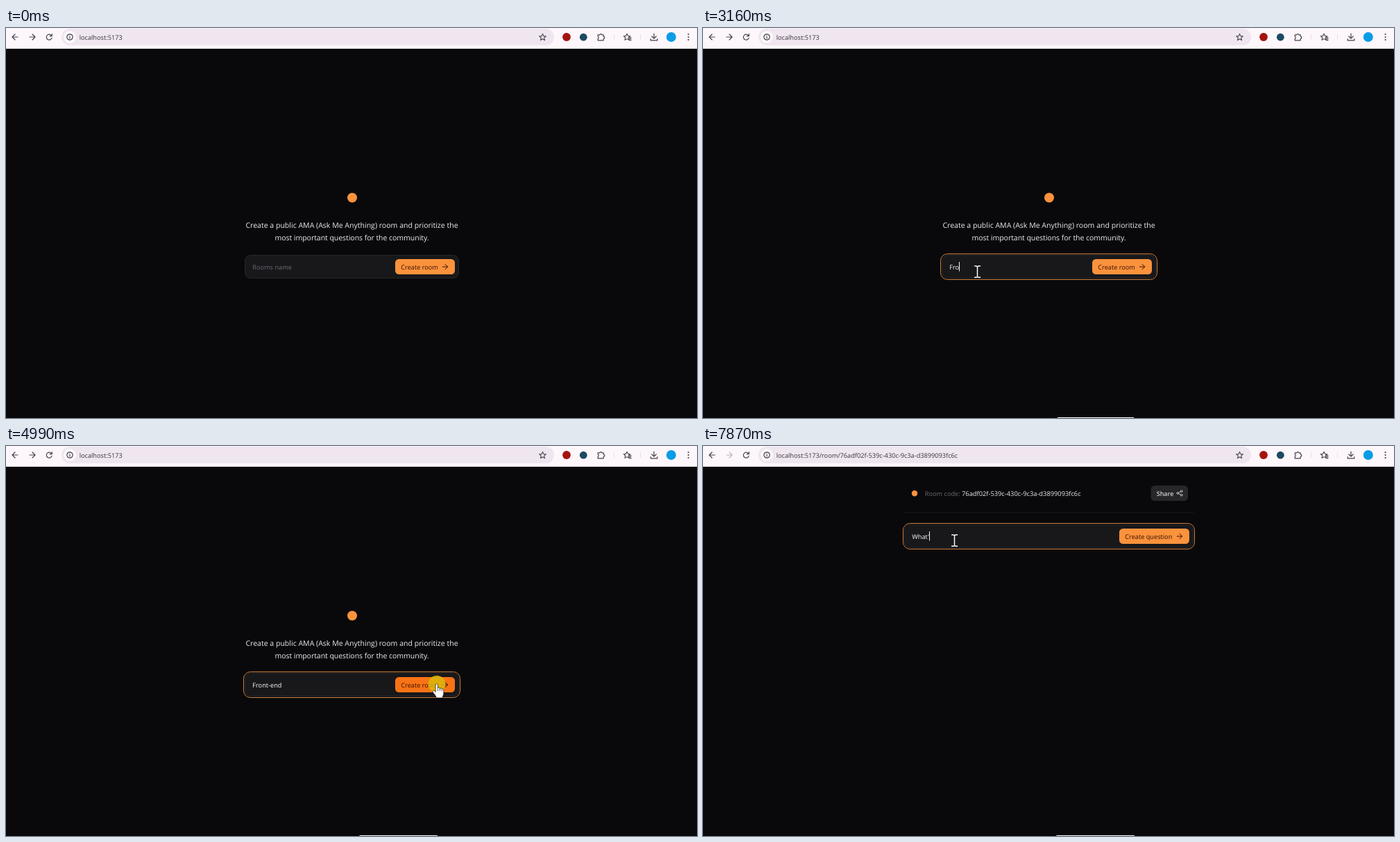
Animation, 996 px wide and 562 px high, one loop 8000 ms. Source, as an HTML page:

```html
<!DOCTYPE html>
<html lang="en">
<head>
<meta charset="utf-8">
<title>Create a room</title>
<style>
  html, body { margin: 0; width: 100%; height: 100%; overflow: hidden; background: #09090b; }
  svg { display: block; width: 996px; height: 562px; }
  text { font: 9.2px "Open Sans", "Noto Sans", sans-serif; white-space: pre; text-rendering: geometricPrecision; }
  .lead { font-size: 10.56px; fill: #ececf0; text-anchor: middle; }
  .hint { fill: #6a6a74; }
  .typed { fill: #fff; }
  .on-btn { fill: #3a1005; }
  .icon { fill: none; stroke-linecap: round; stroke-linejoin: round; }
  .bar .icon { stroke: #47424a; stroke-width: 1.2; }
</style>
</head>
<body>
<svg id="stage" viewBox="0 0 996 562"></svg>
<script>
const LOOP = 8000, NAV = 5069;
const ROOM = '76adf02f-539c-430c-9c3a-d3899093fc6c';

const icon = (d, x, y, more = '') => `<path class="icon" d="${d}" transform="translate(${x} ${y})" ${more}/>`;
const dot = (x, y, r, fill) => `<circle cx="${x}" cy="${y}" r="${r}" fill="${fill}"/>`;
const box = (x, y, w, h, r, fill, stroke = 'none') =>
  `<rect x="${x}" y="${y}" width="${w}" height="${h}" rx="${r}" fill="${fill}" stroke="${stroke}"/>`;
const label = (x, y, str, more = '') => `<text x="${x}" y="${y}" ${more}>${str}</text>`;

const STAR = 'M0-4.8L1.4-1.6 4.8-1.3 2.2 1 3 4.4 0 2.6-3 4.4-2.2 1-4.8-1.3-1.4-1.6Z';

const toolbar = `<g class="bar">
  <rect width="996" height="29" fill="#fdf6fb"/>
  <rect y="29" width="996" height="1" fill="#dcd7dc"/>
  ${box(80, 1, 710, 24, 12, '#efe6ef')}
  ${dot(92, 13, 9, '#fdf8fc')}
  ${icon('M4 0H-4M0-4L-4 0 0 4', 13, 13)}
  ${icon('M-4 0H4M0-4L4 0 0 4', 38, 13, 'id="forward"')}
  ${icon('M3.6-1.6A4 4 0 1 0 3.8 1.4M3.9-4.3V-1.3H.9', 62.3, 13)}
  ${icon('M-4.2 0A4.2 4.2 0 1 0 4.2 0A4.2 4.2 0 1 0-4.2 0M0-.4V2M0-2.2V-2', 92, 13)}
  ${icon(STAR, 773.5, 13.2, 'style="stroke-width:1.1"')}
  ${dot(808, 13, 5.9, '#a5130f')}
  ${dot(832.3, 13.2, 5.4, '#1d4961')}
  ${icon('M-4.4-3.2H-1.8A1.6 1.6 0 0 1 1.3-3.2H3.6V-.8A1.6 1.6 0 0 1 3.6 2.4V4.8H-4.4V2.2A1.6 1.6 0 0 0-4.4-.8Z', 857.6, 13)}
  <path d="M876.5 9v8M914.5 9v8" stroke="#eadfea"/>
  ${icon(STAR + 'M3.4.6H6M3.6 2.6H6M3.8 4.6H6', 895, 13, 'style="stroke-width:1.1"')}
  ${icon('M0-5V2M-3.2-1L0 2.2 3.2-1M-4.8 2.6V4.9H4.8V2.6', 934, 13)}
  ${dot(958.8, 13, 7, '#0b9ce6')}
  ${[9, 13, 17].map(y => dot(983.6, y, 1.1, '#47424a')).join('')}
  ${label(105.7, 16.5, '', 'id="url" fill="#39343c"')}
</g>`;

// Input row; (x, cy) is the middle of its left edge.
const form = ({ id, x, w, cy, btnX, btnW, hint, action }) => `
  <g id="${id}Ring">${box(x - 1.5, cy - 18.5, w + 3, 37, 9.8, '#09090b', '#d3823f')}</g>
  ${box(x + .5, cy - 16.5, w - 1, 33, 8, '#18181b', '#27272a')}
  ${label(x + 11.3, cy + 3.6, hint, `class="hint" id="${id}Hint"`)}
  ${label(x + 11.3, cy + 3.6, '', `class="typed" id="${id}Text"`)}
  <rect id="${id}Caret" y="${cy - 7}" width="1" height="13.5" fill="#f4f4f5"/>
  <rect id="${id}Btn" x="${btnX}" y="${cy - 11}" width="${btnW}" height="22" rx="5.5" fill="#fb923c"/>
  ${label(btnX + 8.3, cy + 3.5, action, 'class="on-btn"')}
  ${icon('M-3.7 0H3.7M0-3.7L3.7 0 0 3.7', btnX + btnW - 14, cy + .1, 'stroke="#3a1005"')}`;

const home = { id: 'home', x: 344, w: 309, cy: 344, btnX: 561, btnW: 86, hint: 'Rooms name', action: 'Create room' };
const room = { id: 'room', x: 290, w: 417, cy: 130, btnX: 600, btnW: 101, hint: 'Whats your question?', action: 'Create question' };

const pages = `
<g id="homePage">
  ${dot(499, 244.5, 7, '#fb923c')}
  ${label(498.5, 288, 'Create a public AMA (Ask Me Anything) room and prioritize the', 'class="lead"')}
  ${label(498.5, 305.5, 'most important questions for the community.', 'class="lead" letter-spacing="-.06"')}
  ${form(home)}
</g>
<g id="roomPage">
  ${dot(305, 68.2, 4.2, '#fb923c')}
  ${label(319.8, 71.5, 'Room code:', 'class="hint"')}
  ${label(373, 71.5, ROOM, 'fill="#ececf0" style="font-size:9.3px"')}
  ${box(645.5, 57, 53.5, 22, 5.5, '#27272a')}
  ${label(653.7, 71.5, 'Share', 'fill="#d4d4d8" style="font-size:9px;font-weight:600"')}
  <g class="icon" stroke="#d4d4d8" stroke-width=".9" transform="translate(687 68)">
    <circle cx="2.6" cy="-2.8" r="1.3"/><circle cx="-2.8" r="1.3"/><circle cx="2.6" cy="2.8" r="1.3"/>
    <path d="M-1.6-.6L1.4-2.2M-1.6.6L1.4 2.2"/>
  </g>
  <rect x="289.5" y="95.5" width="418" height="1" fill="#1b1b1e"/>
  ${form(room)}
</g>`;

const BEAM = 'M-4.4-8H-1.4L0-7 1.4-8H4.6M0-7V7.4M-4.4 8.4H-1.4L0 7.4 1.4 8.4H4.6';
const pointer = `
<rect id="strip" y="561" height="1" fill="#fff"/>
<circle id="press" r="12.3" fill="#d9b90c" opacity=".85"/>
<g id="cursor">
  <path id="arrow" d="M0 0V16L3.7 12.7 6.2 18.2 8.8 17 6.4 11.7H11.9Z" fill="#fff" stroke="#111" stroke-width=".5"/>
  <g id="beam" fill="none">
    <path d="${BEAM}" stroke="#000" stroke-width="3"/><path d="${BEAM}" stroke="#fff" stroke-width="1.6"/>
  </g>
  <g id="hand" stroke="#111" stroke-width=".7" stroke-linejoin="round">
    <path fill="#fff" d="M-1.8 1.2C-1.8-.8 1.4-.8 1.4 1.2V6.2C2 4.4 4.4 5 4.4 7 5 5.2 7.2 5.8 7.2 7.6 8 6.4 9.8 7 9.8 8.8V13.4C9.8 16 8.2 17 8.2 20H-.6C-1 17-4.2 14.2-5.8 11.6-6.6 9.8-4.4 8.6-3.2 10L-1.8 11.6Z"/>
    <path fill="none" d="M1.4 6.5V10M4.4 7V10.2M7.2 7.6V10.4"/>
  </g>
</g>`;

document.getElementById('stage').innerHTML = pages + toolbar + pointer;
const el = Object.fromEntries([...document.querySelectorAll('[id]')].map(n => [n.id, n]));

// First step, last step, number of steps, from, to.
const moves = [
  [210, 750, 8, 868, 551, 431, 400],
  [900, 1130, 4, 431, 400, 395.5, 351],
  [4170, 4398, 4, 395.5, 351, 600, 350],
  [4474, 4540, 2, 600, 350, 630, 358],
  [4616, 4930, 5, 630, 358, 621, 343],
  [5220, 5450, 4, 621, 343, 377, 152],
  [5540, 5620, 2, 377, 152, 363, 140],
  [5920, 5920, 1, 363, 140, 362.5, 136]
];
const clicks = [[1300, 1370], [4990, NAV], [6000, 6090]];

const typing = {
  home: [[0, ''], [2840, 'F'], [3160, 'Fro'], [3240, 'Fron'], [3390, 'Front-'], [3540, 'Front-e'], [3620, 'Front-en'], [4020, 'Front-end']],
  room: [[0, ''], [6630, 'W'], [7400, 'Wh'], [7490, 'Wha'], [7640, 'What'], [7870, "What'"]]
};
const focus = { home: 1300, room: 6000 };
const carets = {
  home: [[1300, 1830], [2370, 4536]],
  room: [[6000, 6470], [6630, 7170], [7400, LOOP]]
};
// Time, opacity, left, width.
const strip = [[0, 0, 511, 110], [1990, .3, 511, 110], [2065, .65, 511, 110], [2140, 1, 511, 110], [3240, 1, 509.5, 112.5],
  [NAV, 0, 511, 110], [6470, .3, 511, 110], [6550, .65, 511, 110], [6630, 1, 511, 110], [6780, 1, 509.5, 112.5]];
const tints = [[0, '#fb923c'], [4398, '#fc8228'], [4474, '#fd7b20'], [4616, '#f97316']];

const latest = (rows, t) => rows.findLast(r => r[0] <= t);
const during = (spans, t) => spans.some(([a, b]) => t >= a && t < b);
const show = (node, on) => node.style.display = on ? '' : 'none';

function cursorAt(t) {
  const m = latest(moves, t);
  if (!m) return null;
  const [a, b, n, x0, y0, x1, y1] = m;
  const gap = n > 1 ? (b - a) / (n - 1) : 1;
  const k = Math.min(n, Math.floor((t - a) / gap + 1e-6) + 1) / n;
  return [x0 + (x1 - x0) * k, y0 + (y1 - y0) * k];
}

function shapeAt(f, x, y) {
  if (x > f.btnX && x < f.btnX + f.btnW && Math.abs(y - f.cy) < 11) return 'hand';
  return x > f.x + 8 && x < f.btnX - 6 && Math.abs(y - f.cy) < 9 ? 'beam' : 'arrow';
}

function drawForm(f, t) {
  const str = latest(typing[f.id], t)[1], text = el[f.id + 'Text'];
  if (text.textContent !== str) text.textContent = str;
  show(el[f.id + 'Hint'], !str);
  show(el[f.id + 'Ring'], t >= focus[f.id]);
  show(el[f.id + 'Caret'], during(carets[f.id], t));
  const end = str ? text.getComputedTextLength() : .4;
  el[f.id + 'Caret'].setAttribute('x', Math.round(f.x + 11.3 + end));
}

function draw(t) {
  const inRoom = t >= NAV, f = inRoom ? room : home;
  show(el.homePage, !inRoom);
  show(el.roomPage, inRoom);
  el.url.textContent = 'localhost:5173' + (inRoom ? '/room/' + ROOM : '');
  el.forward.style.stroke = inRoom ? '#bdb5be' : '';
  drawForm(f, t);
  el.homeBtn.setAttribute('fill', latest(tints, t)[1]);

  const [, alpha, left, width] = latest(strip, t);
  el.strip.setAttribute('opacity', alpha);
  el.strip.setAttribute('x', left);
  el.strip.setAttribute('width', width);

  const at = cursorAt(t);
  show(el.cursor, at);
  show(el.press, at && during(clicks, t));
  if (!at) return;
  const place = `translate(${at[0]} ${at[1]})`, shape = shapeAt(f, ...at);
  el.cursor.setAttribute('transform', place);
  el.press.setAttribute('transform', place);
  for (const s of ['arrow', 'beam', 'hand']) show(el[s], s === shape);
}

const start = performance.now();
function tick() {
  draw((performance.now() - start) % LOOP);
  requestAnimationFrame(tick);
}
tick();
</script>
</body>
</html>
```
